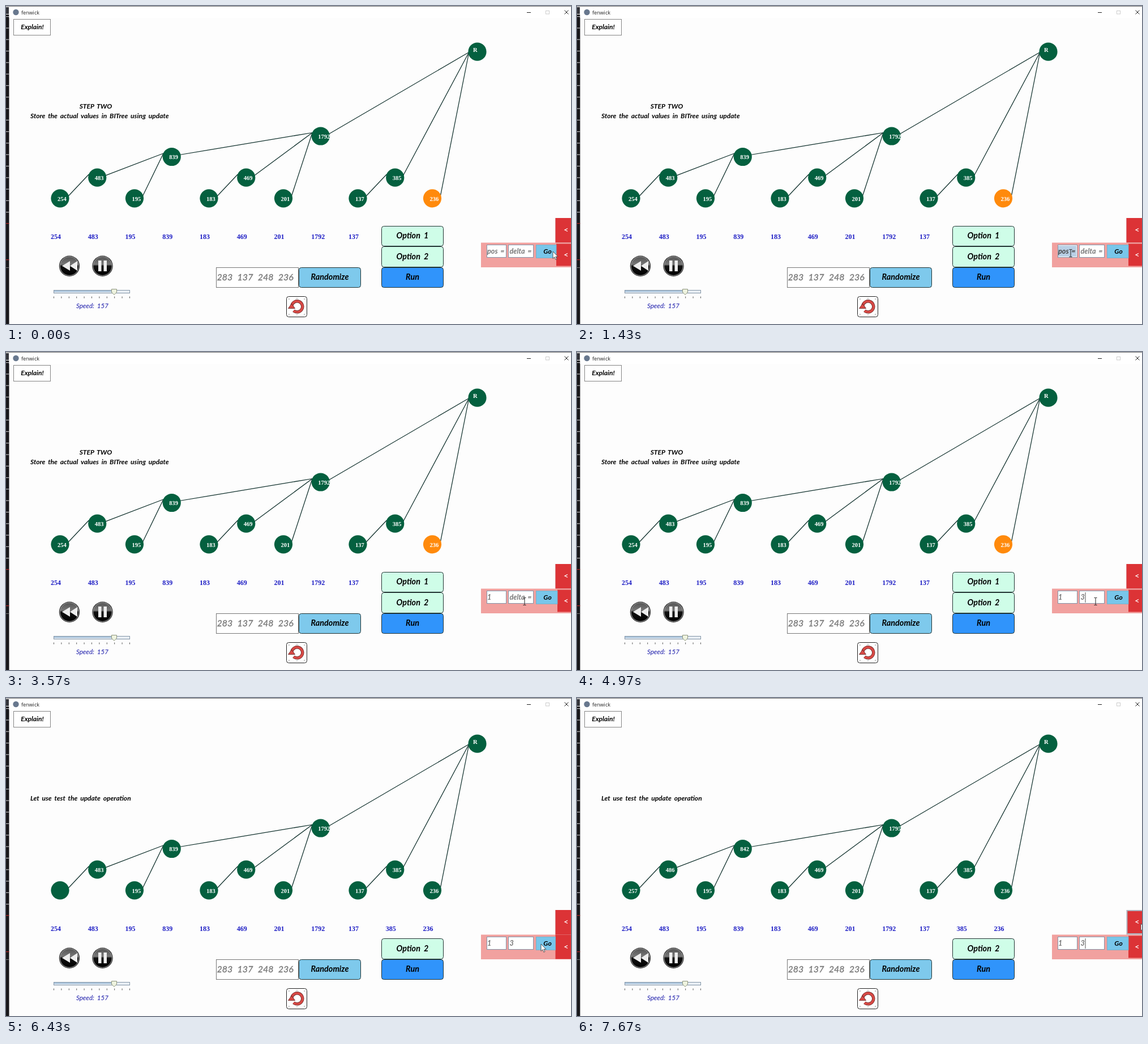
An HTML page for the animation above (7710 ms loop, 998x561 px).

```html
<!DOCTYPE html>
<html lang="en">
<head>
<meta charset="utf-8">
<title>fenwick</title>
<style>
  html, body { margin: 0; width: 100%; height: 100%; overflow: hidden; background: #fdfdfd; }
  svg { display: block; width: 998px; height: 561px; }
  text { white-space: pre; }
  .hand { font: italic bold 12px Lato, sans-serif; word-spacing: 2.2px; }
  .big { font-size: 14.4px; word-spacing: 3px; text-anchor: middle; }
  .serif { font: bold 10.5px "Liberation Serif", serif; fill: #fff; }
  .label { font: bold 12px "Liberation Serif", serif; fill: #1c1cc4; }
  .field { font-size: 12.6px; fill: #777; word-spacing: 2px; }
  .input { font-size: 16px; font-weight: 400; fill: #777; stroke: #777; stroke-width: .3; word-spacing: 4.5px; }
  .speed { font-size: 11.6px; font-weight: 400; fill: #1c1cab; }
</style>
</head>
<body>
<svg id="stage" viewBox="0 0 998 561">
  <defs>
    <linearGradient id="gloss" x2="0" y2="1">
      <stop offset="0" stop-color="#555"/><stop offset=".42" stop-color="#777"/>
      <stop offset=".5" stop-color="#111"/><stop offset="1" stop-color="#000"/>
    </linearGradient>
  </defs>
</svg>
<script>
const LOOP = 7710;
const stage = document.getElementById('stage');

function add(tag, attrs = {}, parent = stage) {
  const el = document.createElementNS('http://www.w3.org/2000/svg', tag);
  set(el, attrs);
  parent.appendChild(el);
  return el;
}
function set(el, attrs) { for (const key in attrs) el.setAttribute(key, attrs[key]); }
const show = (el, on) => el.setAttribute('visibility', on ? 'visible' : 'hidden');
const rect = (x, y, x2, y2, fill, more = {}, parent = stage) =>
  add('rect', { x, y, width: x2 - x, height: y2 - y, fill, ...more }, parent);
const path = (d, attrs, parent = stage) => add('path', { d, ...attrs }, parent);
function text(x, y, content, cls, more = {}, parent = stage) {
  const el = add('text', { x, y, class: cls, ...more }, parent);
  el.textContent = content;
  return el;
}
const write = (el, content) => { if (el.textContent !== content) el.textContent = content; };
const centered = { 'text-anchor': 'middle' };

// Desktop sliver and window frame
rect(0, 0, 998, 561, '#fdfdfd');
rect(0, 15, 5.5, 561, '#17171b');
for (let y = 18; y < 370; y += 20.3) rect(0, y, 5.5, y + 1.2, '#b8b8bc');
rect(0, 383, 5.5, 384.2, '#b02424');
rect(0, 447, 5.5, 448.2, '#b02424');
rect(0, 461, 5.5, 462, '#777');
rect(0, 2, 5, 14, '#33343a');
rect(5.5, 0, 998, 21, '#fff');
rect(0, 0, 998, 1, '#777');
add('circle', { cx: 17.5, cy: 11, r: 5.2, fill: '#68788e' });
text(27, 15, 'fenwick', '', { 'font-family': '"Open Sans", sans-serif', 'font-size': 9, fill: '#222' });
path('M920 11.5h7M986.5 7.5l7 7m0-7l-7 7', { stroke: '#222', fill: 'none' });
rect(953.5, 8.5, 959.5, 14, 'none', { stroke: '#ccc' });

rect(13.5, 23.5, 78.5, 51.5, '#fff', { stroke: '#858585' });
text(46.5, 41, 'Explain!', 'hand', centered);

const heading = text(158.5, 180.5, 'STEP TWO', 'hand', centered);
const message = text(43, 197.5, '', 'hand');

// Tree
const slotX = i => 95.5 + 65.75 * i;
const levelY = [339.3, 302.7, 266, 229.5];
const before = [254, 483, 195, 839, 183, 469, 201, 1792, 137, 385, 236];
const updatePath = [0, 1, 3, 7];
const root = { x: 832.5, y: 80.7 };
const nodes = before.map((value, i) => {
  const pos = i + 1, low = pos & -pos;
  return { value, x: slotX(i), y: levelY[Math.log2(low)], parent: pos + low - 1 };
});
for (const n of nodes) {
  const p = nodes[n.parent] || root;
  const dy = p === root ? 0.8 : -6;
  path(`M${n.x + 14.2} ${n.y - 3.5}L${p.x - 14.7} ${p.y + dy}`, { stroke: '#10302c', 'stroke-width': 1.25 });
}
function drawNode(n, label, dx, dy) {
  n.disc = add('circle', { cx: n.x, cy: n.y, r: 16.1, fill: '#04603f' });
  n.text = text(n.x + dx, n.y + dy, label, 'serif');
}
drawNode(root, 'R', -7.5, 0);
for (const n of nodes) drawNode(n, n.value, -4.5, 4.2);
const labels = before.map((v, i) => text(79 + 65.75 * i, 410.8, v, 'label'));

// Player controls
for (const cx of [112, 170.5]) {
  add('circle', { cx, cy: 458.7, r: 18.2, fill: '#222' });
  add('circle', { cx, cy: 458.7, r: 16.7, fill: 'url(#gloss)', stroke: '#aaa' });
}
path('M113 450v17l-14-8.5zM126 450v17l-13-8.5z', { fill: '#eee' });
path('M163 449h5.5v19h-5.5zM172.5 449h5.5v19h-5.5z', { fill: '#eee' });
rect(84.5, 501.5, 218.5, 506.5, '#e8eef4', { stroke: '#8496a8' });
rect(85, 502, 190, 504.5, '#a9c4dc');
for (let i = 0; i <= 10; i++) rect(84 + 13.4 * i, 512.5, 85 + 13.4 * i, 515.5, '#555');
path('M186.5 499.5h9v5.5l-4.5 4.5l-4.5-4.5z', { fill: '#eef3df', stroke: '#8d957e' });
text(152.5, 532.5, 'Speed: 157', 'hand speed', centered);

// Buttons
function button(x, y, x2, y2, fill, label, parent = stage) {
  rect(x, y, x2, y2, fill, { rx: 4, stroke: '#233' }, parent);
  text((x + x2) / 2, (y + y2) / 2 + 4.3, label, 'hand big', {}, parent);
}
rect(371.5, 461.5, 516.5, 496.5, '#fff', { stroke: '#777' });
text(372.5, 484, '283 137 248 236', 'hand input');
button(517.5, 461.5, 626.5, 496.5, '#7ec9ec', 'Randomize');
const option1 = add('g');
button(663.5, 388.5, 772.5, 423.5, '#cffde8', 'Option 1', option1);
button(663.5, 424.5, 772.5, 460.5, '#cffde8', 'Option 2');
button(663.5, 461.5, 772.5, 496.5, '#3094fb', 'Run');

rect(495.5, 512.5, 531.5, 548.5, '#fff', { rx: 4, stroke: '#222' });
for (const [x, y] of [[500, 517], [527, 517], [500, 544], [527, 544], [514, 516], [514, 545]])
  add('circle', { cx: x, cy: y, r: .8, fill: '#777' });
const resetArc = 'M505 528a9.5 9.5 0 1 1 3 9.5';
path(resetArc, { fill: 'none', stroke: '#5b1f1f', 'stroke-width': 5.4 });
path(resetArc, { fill: 'none', stroke: '#d84a46', 'stroke-width': 4 });
path('M498.5 533.5l6-8.5l6 8.5z', { fill: '#d84a46', stroke: '#5b1f1f', 'stroke-width': .8 });

// Side panel
rect(970.5, 374, 998, 417.5, '#aeb0bc');
const upperTab = rect(970.5, 374, 998, 417.5, '#dc3336');
rect(839, 417.5, 998, 461, '#f1a19f');
const lowerTab = rect(974, 419.5, 998, 459.5, '#dc3336');
for (const y of [395, 439])
  path(`M992 ${y - 2.5}l-5 2.5l5 2.5`, { fill: 'none', stroke: '#fff', 'stroke-width': 1.2 });
for (const [x, x2] of [[849.5, 883.5], [887.5, 931.5]])
  rect(x, 421.5, x2, 443.5, '#fff', { stroke: '#8395a9' });
const selection = rect(850, 423, 882, 442, '#b8cfe5');
const posText = text(850, 437.3, '', 'hand field');
const deltaText = text(889.5, 437.3, '', 'hand field');
const caret = rect(897.5, 424, 898.5, 442, '#555');
const goButton = rect(936.5, 421.5, 974, 444.5, '#78c6ea', { stroke: '#7fb0c6' });
text(956.5, 436.5, 'Go', 'hand', centered);

const arrow = path('M0 0v12.5l2.9-2.7l2 4.6l2-.9l-2-4.4h4z', { fill: '#fff', stroke: '#333', 'stroke-width': .8 });
const beam = path('M-2.5-6.5h2l.5 .5l.5-.5h2M0-6v12M-2.5 6.5h2l.5-.5l.5 .5h2', { fill: 'none', stroke: '#222' });

// Pointer keys: time, x, y
const pointer = [
  [0, 966, 433], [250, 966, 433], [850, 872, 436], [2500, 872, 436], [3100, 916, 440],
  [5250, 916, 440], [5800, 945, 434], [7050, 945, 434], [7600, 996, 398], [LOOP, 996, 398]
];
function pointerAt(t) {
  const i = Math.max(1, pointer.findIndex(k => k[0] > t));
  const [t0, x0, y0] = pointer[i - 1], [t1, x1, y1] = pointer[i];
  const u = (t - t0) / (t1 - t0), e = u * u * (3 - 2 * u);
  return [x0 + (x1 - x0) * e, y0 + (y1 - y0) * e];
}

const UPDATE = 6350, STEP = 150;

function render(t) {
  const [x, y] = pointerAt(t);
  const overField = y > 421 && y < 444 && ((x > 849 && x < 884) || (x > 887 && x < 932));
  show(arrow, !overField);
  show(beam, overField);
  set(overField ? beam : arrow, { transform: `translate(${x.toFixed(1)} ${y.toFixed(1)})` });

  const updating = t >= UPDATE;
  write(heading, updating ? '' : 'STEP TWO');
  write(message, updating ? 'Let use test the update operation' : 'Store the actual values in BITree using update');
  set(message, { y: updating ? 180.5 : 197.5 });
  show(option1, !updating);
  labels.forEach((el, i) => show(el, updating || i < 9));
  set(nodes[10].disc, { fill: updating ? '#04603f' : '#ff8a0c' });
  updatePath.forEach((index, k) => {
    const blankAt = UPDATE + 20 + k * STEP, node = nodes[index];
    const value = t < blankAt ? node.value : t < blankAt + 100 ? '' : node.value + 3;
    write(node.text, String(value));
  });

  const selected = t >= 1150 && t < 2000;
  show(selection, selected);
  posText.style.fill = selected ? '#444' : '#777';
  write(posText, t < 2000 ? 'pos =' : t < 2250 ? '' : '1');
  write(deltaText, t < 4100 ? 'delta =' : t < 4550 ? '' : '3');

  const pressed = updating && t < 7100;
  show(caret, t >= 4550 && (t + 400) % 1000 < 500 && !pressed);
  const tabX = pressed ? 970.5 : t < 300 ? 972 : 974;
  const inset = pressed ? 0 : 2;
  set(lowerTab, { x: tabX, width: 998 - tabX, y: 417.5 + inset, height: 43 - 2 * inset });
  set(goButton, { width: tabX - 936.5 });
  const hoverUpper = x > 970 && y > 374 && y < 417;
  set(upperTab, hoverUpper
    ? { x: 972.5, width: 25.5, y: 376, height: 39 }
    : { x: 970.5, width: 27.5, y: 374, height: 43.5 });
}

const start = performance.now();
function tick() {
  render((performance.now() - start) % LOOP);
  requestAnimationFrame(tick);
}
render(0);
requestAnimationFrame(tick);
</script>
</body>
</html>
```
